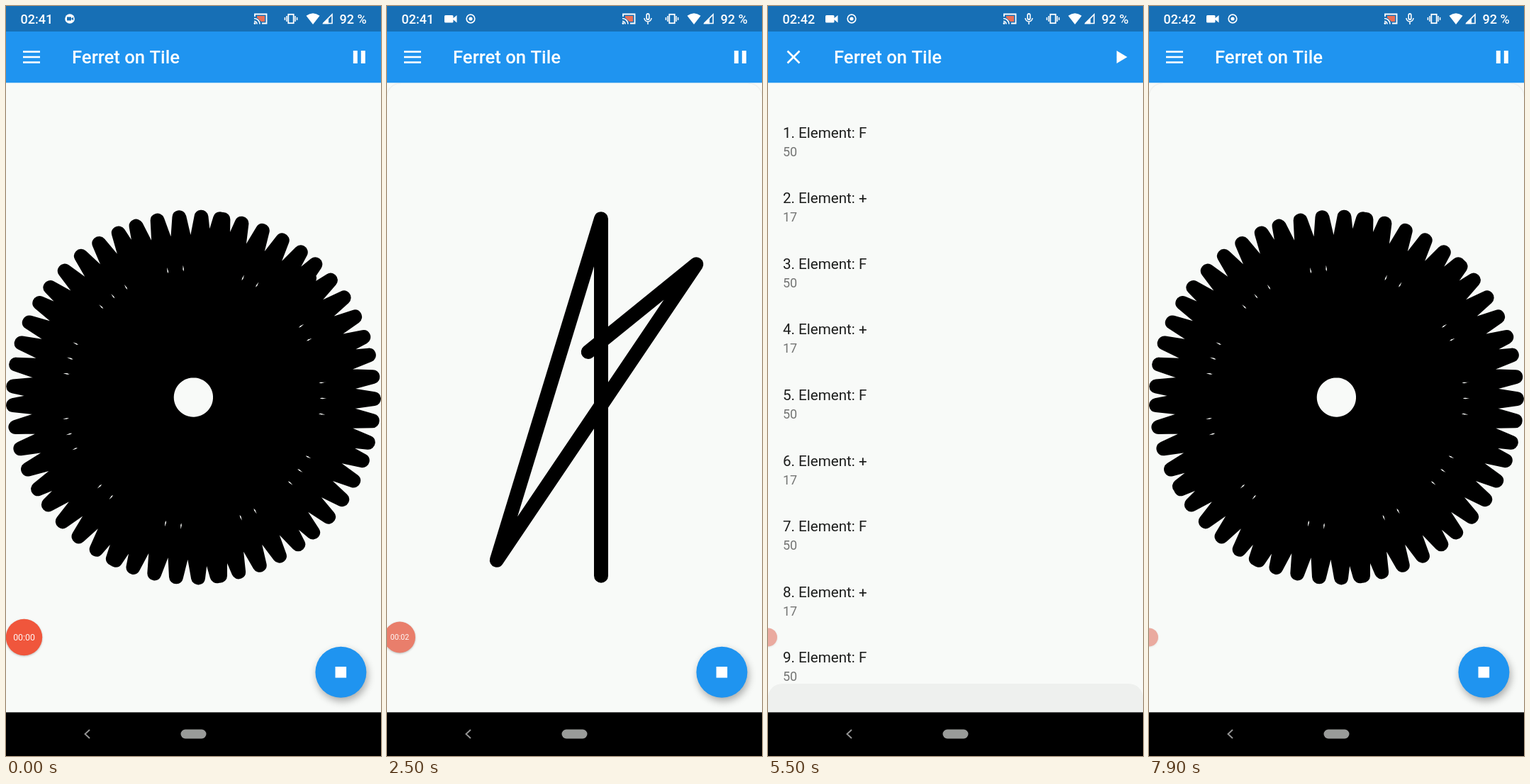
Write an HTML page with a canvas that moves like this. It is 529 px wide and 1058 px high and loops after 8000 ms.

```html
<!DOCTYPE html>
<html lang="en">
<head>
<meta charset="utf-8">
<title>Turtle graphics</title>
<style>
html, body { margin: 0; width: 100%; height: 100%; overflow: hidden; background: #000; }
canvas { display: block; width: 529px; height: 1058px; }
</style>
</head>
<body>
<canvas id="stage" width="529" height="1058"></canvas>
<script>
const g = document.getElementById('stage').getContext('2d');
const W = 529, TOP = 108.3, BOTTOM = 996.4, SHEET_TRAVEL = 847;
const BLUE = '#1f94f0', PAPER = '#f8faf8';
const LOOP = 8000, TICK = 100;

// Turtle figure: every stroke turns by 197 degrees around a circle.
const TURN = 197, RADIUS = 254.5, CENTER = { x: 264.4, y: 552 };
const STROKE_MS = 100, STROKES_AT_START = 55.96;
const STOP_AT = 1050, RESTART_AT = 2161;
const OPEN_AT = 4310, CLOSE_AT = 5849;
const SLIDE_STALL = 39; // drawing time lost while the sheet slides away

const clamp = v => Math.max(0, Math.min(1, v));
const mix = (a, b, p) => a + (b - a) * p;
const ramp = (t, from, to) => clamp((t - from) / (to - from));

function rect(x, y, w, h, color) {
  g.fillStyle = color;
  g.fillRect(x, y, w, h);
}

function disc(x, y, r, color) {
  g.fillStyle = color;
  g.beginPath();
  g.arc(x, y, r, 0, 2 * Math.PI);
  g.fill();
}

function pill(x, y, w, h, r, color) {
  g.fillStyle = color;
  g.beginPath();
  g.roundRect(x, y, w, h, r);
  g.fill();
}

function trace(points, close) {
  g.beginPath();
  points.forEach(([x, y]) => g.lineTo(x, y));
  if (close) g.closePath();
}

function poly(points, color) {
  trace(points, true);
  g.fillStyle = color;
  g.fill();
}

function line(points, color, width) {
  trace(points, false);
  g.strokeStyle = color;
  g.lineWidth = width;
  g.stroke();
}

function text(str, x, y, size, color, weight = 400, align = 'left') {
  g.font = `${weight} ${size}px Roboto, sans-serif`;
  g.textAlign = align;
  g.fillStyle = color;
  g.fillText(str, x, y);
}

function at(x, y, draw) {
  g.save();
  g.translate(x, y);
  draw();
  g.restore();
}

// Critically damped spring, 1 at the start and 0 at rest.
function springLeft(ms) {
  if (ms <= 0) return 1;
  const s = ms / 1000, w = Math.sqrt(500);
  return Math.exp(-w * s) * (1 + (w - 2) * s);
}

function sheetOpen(t) {
  return t < CLOSE_AT ? 1 - springLeft(t - OPEN_AT) : springLeft(t - CLOSE_AT);
}

function strokeCount(t) {
  if (t < RESTART_AT) return STROKES_AT_START + Math.min(t, STOP_AT) / STROKE_MS;
  const stall = SLIDE_STALL * ramp(t, OPEN_AT, OPEN_AT + 300);
  return (t - RESTART_AT - stall) / STROKE_MS;
}

function vertex(k) {
  const a = (171.5 + TURN * k) * Math.PI / 180;
  return [CENTER.x + RADIUS * Math.sin(a), CENTER.y - RADIUS * Math.cos(a)];
}

function drawFigure(count) {
  const whole = Math.floor(count), part = count - whole;
  const points = Array.from({ length: whole + 1 }, (_, k) => vertex(k));
  const [ax, ay] = points[whole], [bx, by] = vertex(whole + 1);
  points.push([mix(ax, bx, part), mix(ay, by, part)]);
  g.lineCap = g.lineJoin = 'round';
  line(points, '#000', 20);
  g.lineCap = 'butt';
  g.lineJoin = 'miter';
}

function drawList() {
  for (let i = 0; i < 9; i++) {
    const y = 185.6 + i * 92.6;
    text(`${i + 1}. Element: ${i % 2 ? '+' : 'F'}`, 21, y, 20.6, '#1c1d1c');
    text(i % 2 ? '17' : '50', 21, y + 25.9, 18, '#747574');
  }
}

function drawSheet(t, open) {
  const shift = SHEET_TRAVEL * open;
  g.save();
  g.beginPath();
  g.rect(0, 108, W, BOTTOM - 108);
  g.clip();
  g.translate(0, 108 + shift);
  g.beginPath();
  g.roundRect(0, 1, W, 900, [20, 20, 0, 0]);
  if (t >= TICK && open < 0.9) {
    g.shadowColor = 'rgba(0,0,0,.14)';
    g.shadowBlur = 2;
  }
  g.fillStyle = PAPER;
  g.fill();
  g.shadowColor = 'transparent';
  g.clip();
  at(0, -108, () => drawFigure(strokeCount(t)));
  g.globalAlpha = clamp(open * 1.28);
  rect(0, 0, W, 900, '#eef0ee');
  g.restore();
}

function drawMenuIcon(p) {
  at(36, 72, () => {
    const half = 12, gap = 7.5 * (1 - p * p);
    const bar = (y, w) => line([[-w, y], [w, y]], '#fff', 2.6);
    g.rotate(-p * Math.PI / 4);
    bar(-gap, half);
    if (p < 0.95) bar(0, half * (1 - p * p));
    g.rotate(-p * p * Math.PI / 2);
    bar(gap, half);
  });
}

function drawPauseIcon(open) {
  const p = Math.pow(open, 1.7);
  const bar = [[-8.5, -9], [-2.5, -9], [-2.5, 9], [-8.5, 9]];
  const wedge = [[0, -8.5], [0, -8.5], [0.2, 6.5], [-9, 6.5]];
  at(498.3, 72, () => {
    g.rotate(p * Math.PI / 2);
    for (const side of [1, -1]) {
      poly(bar.map(([x, y], i) => [side * mix(x, wedge[i][0], p), mix(y, wedge[i][1], p)]), '#fff');
    }
  });
}

function drawRipple(t, start) {
  const alpha = 0.07 * ramp(t, start, start + 80) * (1 - ramp(t, start + 270, start + 480));
  if (alpha > 0) {
    disc(498, 72, mix(15, 45, ramp(t, start, start + 150)), `rgba(255,255,255,${alpha})`);
  }
}

function drawHeader(t, open) {
  rect(0, 0, W, TOP, BLUE);
  rect(0, 0, W, 36, '#176fb5');
  drawRipple(t, 4120);
  drawRipple(t, 5740);
  text('Ferret on Tile', 93, 81, 25.7, '#fff', 500);
  drawMenuIcon(open);
  drawPauseIcon(open);
}

function drawCast(x) {
  at(x, 18, () => {
    line([[-8, -3], [-8, -6.5], [8.5, -6.5], [8.5, 6.5], [2, 6.5]], '#fff', 1.8);
    poly([[-5, -4], [6, -4], [6, 4], [1, 4], [-5, -1.5]], '#e96f55');
    g.strokeStyle = '#fff';
    g.lineWidth = 1.6;
    for (const r of [4, 8]) {
      g.beginPath();
      g.arc(-9, 7.5, r, -Math.PI / 2, 0);
      g.stroke();
    }
    disc(-8, 6.5, 1.4, '#fff');
  });
}

function drawMic() {
  pill(365.4, 10, 5.2, 10, 2.6, '#fff');
  pill(367, 12, 2, 6, 1, '#176fb5');
  g.strokeStyle = '#fff';
  g.lineWidth = 1.5;
  g.beginPath();
  g.arc(368, 17, 5, 0, Math.PI);
  g.moveTo(368, 22);
  g.lineTo(368, 26);
  g.stroke();
}

function drawStatus(t) {
  text(t < 2600 ? '02:41' : '02:42', 20.5, 24.5, 18, '#fff', 500);
  if (t < 200) {
    disc(90, 18, 6.8, '#fff');
    rect(86, 15.5, 6, 5, '#176fb5');
    poly([[92, 18], [95, 15.5], [95, 20.5]], '#176fb5');
    drawCast(359);
  } else {
    pill(81, 13, 12.5, 10.5, 1.5, '#fff');
    poly([[93, 17.5], [98.5, 13], [98.5, 23.5], [93, 19]], '#fff');
    g.strokeStyle = '#fff';
    g.lineWidth = 1.7;
    g.beginPath();
    g.arc(118, 18, 5.8, 0, 2 * Math.PI);
    g.stroke();
    disc(118, 18, 2.6, '#fff');
    drawCast(341);
    drawMic();
  }
  g.strokeStyle = '#fff';
  g.lineWidth = 1.8;
  g.strokeRect(398.3, 11.8, 7.4, 12.4);
  for (const s of [-1, 1]) {
    line([[402 + s * 6, 14], [402 + s * 6, 22]], '#fff', 1.5);
    line([[402 + s * 8.6, 16], [402 + s * 8.6, 20]], '#fff', 1.5);
  }
  g.fillStyle = '#fff';
  g.beginPath();
  g.moveTo(433, 26);
  g.lineTo(423.5, 13.8);
  g.quadraticCurveTo(433, 6.5, 442.5, 13.8);
  g.fill();
  line([[447, 24.5], [460, 24.5], [460, 12], [447.5, 24.5]], '#fff', 1.6);
  poly([[446, 25.3], [455, 16.5], [455, 25.3]], '#fff');
  text('92 %', 470.5, 24.5, 18, '#fff', 500);
}

function drawButton(t) {
  const scale = t < CLOSE_AT ? 1 - ramp(t, OPEN_AT, OPEN_AT + 180) : ramp(t, 6100, 6300);
  if (!scale) return;
  const pressed = (t >= 950 && t < 1200) || (t >= 2000 && t < 2250);
  at(472.4, 939.8, () => {
    g.scale(scale, scale);
    g.shadowColor = 'rgba(0,0,0,.32)';
    g.shadowBlur = pressed ? 16 : 11;
    g.shadowOffsetX = 2;
    g.shadowOffsetY = pressed ? 7 : 5;
    disc(0, 0, 36, BLUE);
    g.shadowColor = 'transparent';
    if (t >= STOP_AT && t < RESTART_AT) poly([[-5.4, -9], [9, 0], [-5.4, 9]], '#fff');
    else rect(-7.9, -7.8, 15.6, 15.6, '#fff');
  });
}

// Recorder bubble: start time, end time, x, radius, red, green, blue.
const BUBBLE = [
  [0, 0, 25.5, 25.7, 240, 86, 60],
  [300, 700, 18, 22, 233, 126, 107],
  [2900, 3100, 15, 21, 230, 140, 124],
  [3600, 3900, 0, 13, 234, 170, 159]
];

function drawBubble(t) {
  let state = BUBBLE[0].slice(2);
  for (const [from, to, ...next] of BUBBLE.slice(1)) {
    const p = ramp(t, from, to);
    state = state.map((v, i) => mix(v, next[i], p));
  }
  const [x, r, ...rgb] = state;
  g.save();
  g.shadowColor = `rgba(0,0,0,${t < 3600 ? 0.25 : 0.08})`;
  g.shadowBlur = 3;
  g.shadowOffsetY = 1;
  disc(x, 890.5, r, `rgb(${rgb.map(Math.round)})`);
  g.restore();
  if (t < 3700) {
    text('00:0' + Math.floor(t / 1000), x, 890.5 + r * 0.17, r * 0.48, 'rgba(255,255,255,.95)', 400, 'center');
  }
}

function drawNav() {
  rect(0, BOTTOM, W, 62, '#000');
  line([[118, 1021], [111.5, 1027], [118, 1033]], '#959595', 1.9);
  pill(246.5, 1020.5, 36, 13, 6.5, '#999b99');
}

function draw(t) {
  const open = sheetOpen(t);
  rect(0, 0, W, 1058, PAPER);
  drawList();
  drawSheet(t, open);
  drawHeader(t, open);
  drawStatus(t);
  drawButton(t);
  drawBubble(t);
  drawNav();
}

function loop() {
  const t = performance.now() % LOOP;
  draw(Math.floor((t + 5) / TICK) * TICK % LOOP);
  requestAnimationFrame(loop);
}
loop();
</script>
</body>
</html>
```
